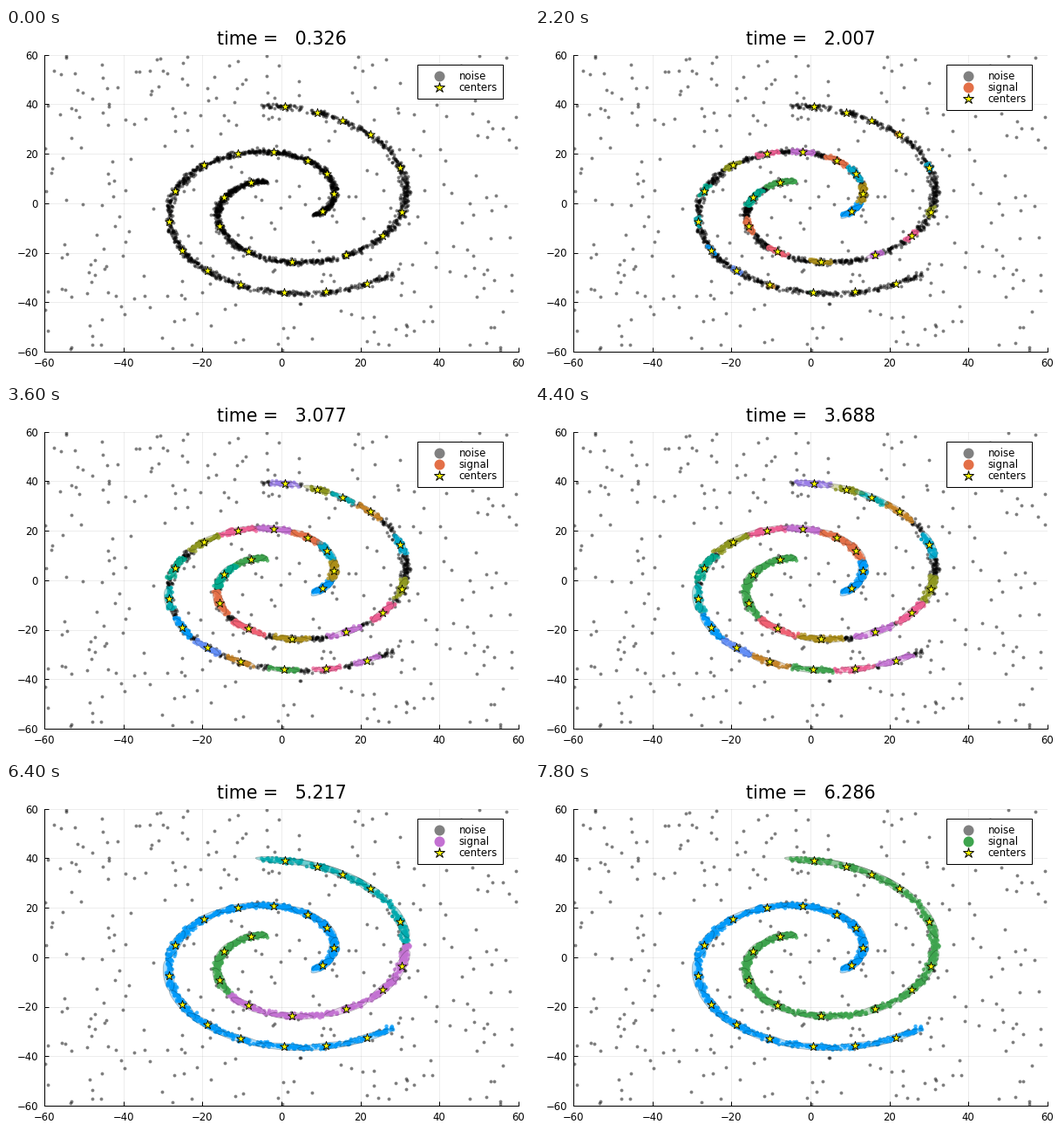
Write a matplotlib script that moves like this. It is 600 px wide and 400 px high and loops after 8000 ms.

```python
import numpy as np
import matplotlib.pyplot as plt
from matplotlib.animation import FuncAnimation
from matplotlib.collections import EllipseCollection
from matplotlib.colors import to_rgba
from matplotlib.patches import Rectangle

W, H = 600, 400
FRAMES, INTERVAL = 40, 200
PT = 0.72  # points per pixel at 100 dpi
LEFT, RIGHT, TOP, BOTTOM = 44, 587.8, 30.5, 371

COLORS = dict(
    blue="#009AFA", orange="#E36F47", green="#3EA44E", purple="#C371D2",
    ochre="#AC8E18", teal="#00AAAE", pink="#ED5E93", amber="#C68225",
    jade="#00A98D", olive="#8E971E", cyan="#00A9CC", violet="#9B7FE9",
    sky="#618DF6", red="#F06073",
)
LEGEND_STEPS = [(0, "blue"), (8, "orange"), (27, "teal"), (31, "purple"),
                (35, "green")]


class Arm:
    """Spiral r = 5 * phi turned by `turn`, with cluster centers along it."""

    def __init__(self, rng, turn, span, phi, names, groups, merged):
        self.names = names.split()
        self.groups = [g for g, count in groups for _ in range(count)]
        self.merged = merged
        self.turn = turn
        self.phi = np.array(phi)
        self.birth = 2.1 * (self.phi - 2)
        self.join = 16 + 1.5 * self.phi
        self.stars = self.at(self.phi)
        step = self.at(self.phi + 0.01) - self.at(self.phi - 0.01)
        self.angle = np.degrees(np.arctan2(step[:, 1], step[:, 0]))

        p = rng.uniform(*span, 1000)
        self.offset = rng.normal(0, 0.52, p.size)
        self.points = self.at(p, self.offset)
        gap = np.abs(2.5 * (p[:, None] ** 2 - self.phi ** 2))  # arc length
        self.near = gap.argmin(axis=1)
        self.gap = gap.min(axis=1)

    def at(self, phi, offset=0):
        r, a = 5 * phi + offset, phi + self.turn
        return np.column_stack([r * np.cos(a), r * np.sin(a)])

    def size(self, frame):
        """Half length and half width of each cluster."""
        age = np.maximum(frame - self.birth, 0)
        half = np.sqrt(age) + 0.0038 * frame ** 2
        width = np.minimum(0.4 + 0.16 * half, 1.3)
        return half * (age > 0), width * (age > 0)

    def color(self, i, frame):
        if frame >= self.merged:
            return self.groups[0]
        if frame < self.join[i]:
            return self.names[i]
        group = self.groups[i]
        return "purple" if group == "red" and frame >= 30 else group

    def rgba(self, frame, alpha):
        return np.array([to_rgba(COLORS[self.color(i, frame)], alpha)
                         for i in range(len(self.phi))])


rng = np.random.default_rng(12)
stray = rng.uniform(-60, 60, (325, 2))
arms = [
    Arm(rng, -2.5, (1.95, 8),
        [2.18, 2.77, 3.31, 3.71, 4.17, 4.57, 4.98, 5.46,
         5.90, 6.29, 6.61, 6.91, 7.23, 7.52, 7.80],
        "blue ochre cyan orange purple pink olive jade "
        "teal blue sky amber green pink purple",
        [("blue", 2), ("orange", 6), ("violet", 3), ("amber", 1),
         ("green", 3)], 30),
    Arm(rng, 0.05, (1.93, 7.93),
        [2.26, 2.94, 3.62, 4.26, 4.77, 5.32, 5.76,
         6.12, 6.68, 7.12, 7.37, 7.56, 7.78],
        "green jade orange red ochre purple pink "
        "olive cyan amber teal olive violet",
        [("green", 3), ("red", 2), ("purple", 3), ("teal", 5)], 35),
]
stars = np.vstack([arm.stars for arm in arms])
angles = np.concatenate([arm.angle for arm in arms])
cap = 2.5 + 0.13 * np.hypot(*stars.T)

plt.rcParams["font.family"] = "DejaVu Sans"
fig = plt.figure(figsize=(W / 100, H / 100), dpi=100, facecolor="white")
ax = fig.add_axes([LEFT / W, 1 - BOTTOM / H,
                   (RIGHT - LEFT) / W, (BOTTOM - TOP) / H])
ticks = range(-60, 61, 20)
ax.set(xlim=(-60, 60), ylim=(-60, 60), xticks=ticks, yticks=ticks)
ax.tick_params(direction="in", length=5 * PT, width=PT, pad=7 * PT,
               labelsize=11.6 * PT)
ax.grid(color="black", alpha=0.1, linewidth=0.5)
ax.set_axisbelow(True)
ax.spines[["top", "right"]].set_visible(False)
ax.spines[["left", "bottom"]].set_linewidth(PT)

noise = ax.scatter([], [], s=7.8, color=(0, 0, 0, 0.5), linewidths=0, zorder=3)
signal = ax.scatter([], [], s=10, linewidths=0, zorder=4)
ax.scatter(*stars.T, marker="*", s=(10.3 * PT) ** 2, color="yellow",
           edgecolors="black", linewidths=0.6, zorder=6)

# Overlay in pixel units
over = fig.add_axes([0, 0, 1, 1])
over.set(xlim=(0, W), ylim=(H, 0))
over.axis("off")
title = over.text(316.4, 18.8, "", fontsize=20.7 * PT, ha="center",
                  va="baseline")
box = over.add_patch(Rectangle((472, 42), 97.5, 39, facecolor="white",
                               edgecolor="black", linewidth=PT))


def legend_row(label, marker, size, color, **kw):
    mark, = over.plot([496.6], [55], marker, ms=size * PT, color=color, **kw)
    text = over.text(519.5, 55, label, fontsize=11.8 * PT, va="baseline")
    return mark, text


rows = [
    legend_row("noise", "o", 12, "#808080", mew=0),
    legend_row("signal", "o", 12, COLORS["blue"], mew=0),
    legend_row("centers", "*", 12.3, "yellow", mec="black", mew=0.7),
]
blobs = []


def draw_legend(frame, has_signal):
    shown = rows if has_signal else [rows[0], rows[2]]
    for item in rows[1]:
        item.set_visible(has_signal)
    for i, (mark, text) in enumerate(shown):
        y = 55 + 13 * i
        mark.set_ydata([y])
        text.set_y(y + 4.2)
    box.set_height(13 * (len(shown) + 1))
    name = [c for start, c in LEGEND_STEPS if frame >= start][-1]
    rows[1][0].set_color(COLORS[name])


def draw_blobs(frame, half, width):
    while blobs:
        blobs.pop().remove()
    on = half > 0
    if on.any():
        fill = np.vstack([arm.rgba(frame, 0.35) for arm in arms])[on]
        blob = EllipseCollection(
            2 * np.minimum(half, cap)[on], 2 * width[on], angles[on],
            units="xy", offsets=stars[on], transOffset=ax.transData,
            facecolors=fill, edgecolors=(0, 0, 0, 0.25), linewidths=0.6,
            zorder=5)
        ax.add_collection(blob, autolim=False)
        blobs.append(blob)
    return bool(on.any())


def draw(frame):
    title.set_text(f"time = {0.3264 + 0.15282 * frame:7.3f}")
    gray, lit, tints = [stray], [], []
    sizes = [arm.size(frame) for arm in arms]
    for arm, (half, width) in zip(arms, sizes):
        near = arm.near
        inside = ((arm.gap < half[near])
                  & (np.abs(arm.offset) < width[near]))
        gray.append(arm.points[~inside])
        lit.append(arm.points[inside])
        tints.append(arm.rgba(frame, 0.75)[near[inside]])
    noise.set_offsets(np.vstack(gray))
    signal.set_offsets(np.vstack(lit))
    signal.set_facecolor(np.vstack(tints))
    half, width = np.hstack(sizes)
    draw_legend(frame, draw_blobs(frame, half, width))
    return []


anim = FuncAnimation(fig, draw, frames=FRAMES, interval=INTERVAL,
                     init_func=lambda: draw(0), repeat=True, repeat_delay=0)
plt.show()
```
